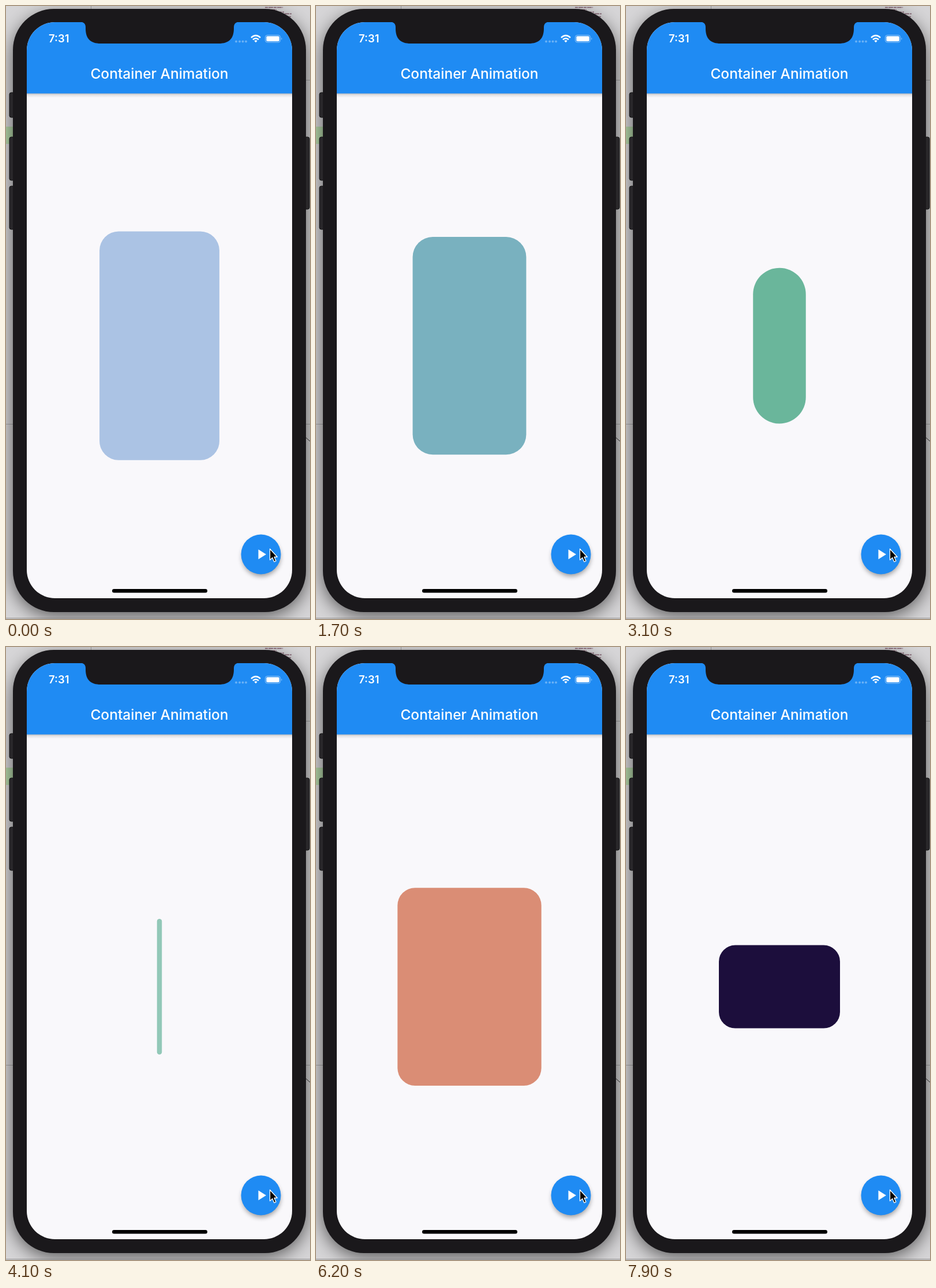
An HTML page that plays this animation: 527 px wide and 1062 px high, repeating every 8 s.

```html
<!DOCTYPE html>
<html lang="en">
<head>
<meta charset="utf-8">
<title>Container Animation</title>
<style>
  html, body { margin: 0; width: 100%; height: 100%; overflow: hidden; background: #cfcfcf; }
  svg { display: block; width: 100%; height: 100%; }
  text { font-family: Inter, Roboto, sans-serif; fill: #fff; }
</style>
</head>
<body>
<svg viewBox="0 0 527 1062" xmlns="http://www.w3.org/2000/svg">
  <defs>
    <filter id="blur" x="-20%" y="-20%" width="140%" height="140%"><feGaussianBlur stdDeviation="16"/></filter>
    <filter id="soft" x="-50%" y="-50%" width="200%" height="200%"><feGaussianBlur stdDeviation="4"/></filter>
    <linearGradient id="barShade" x2="0" y2="1">
      <stop offset="0" stop-color="#000" stop-opacity=".26"/>
      <stop offset=".4" stop-color="#000" stop-opacity=".09"/>
      <stop offset="1" stop-color="#000" stop-opacity="0"/>
    </linearGradient>
    <clipPath id="screen"><rect x="36" y="28" width="460" height="998" rx="49"/></clipPath>
  </defs>

  <!-- desktop behind the phone -->
  <rect width="527" height="1062" fill="#d6d5d7"/>
  <rect y="209" width="14" height="30" fill="#b5d6a9"/>
  <path d="M0 724.5H14M518 724.5H527M518 128.5H527M147.500 0V5" stroke="#a5a5a7" fill="none"/>
  <path d="M519 747L527 754" stroke="#333"/>
  <path d="M449 2.500h31M453 6.500h16M458 10.500h24M462 13.500h33M468 18.500h26" stroke="#6b3f52" stroke-width="1.500" stroke-dasharray="5 1 8 1" opacity=".8"/>
  <rect x="12" y="16" width="508" height="1040" rx="72" opacity=".62" filter="url(#blur)"/>
  <path d="M0 1060.500H527" stroke="#777" opacity=".7"/>

  <!-- phone -->
  <g fill="#29272a" stroke="#111">
    <rect x="6" y="150" width="14" height="43" rx="3"/>
    <rect x="6" y="227" width="14" height="75" rx="3"/>
    <rect x="6" y="312" width="14" height="75" rx="3"/>
    <rect x="512" y="227" width="14" height="125" rx="3"/>
  </g>
  <rect x="12" y="5" width="508" height="1045" rx="71" fill="#1a181b"/>

  <g clip-path="url(#screen)">
    <rect x="36" y="28" width="460" height="998" fill="#f9f8fb"/>
    <rect x="36" y="151" width="460" height="8" fill="url(#barShade)"/>
    <rect x="36" y="28" width="460" height="123.500" fill="#1f8bf3"/>
    <path d="M129 27.500Q138 28 138 37V39C138 57 147 65 164 65H369C386 65 395 57 395 39V37Q395 28 404 27.500Z" fill="#1a181b"/>
  </g>

  <!-- status bar and title -->
  <text x="74" y="63" font-size="18.500" font-weight="600">7:31</text>
  <text x="266" y="125.500" font-size="24.500" font-weight="500" text-anchor="middle">Container Animation</text>
  <g fill="#fff" opacity=".33">
    <circle cx="399" cy="61.500" r="1.900"/><circle cx="405" cy="61.500" r="1.900"/>
    <circle cx="410.500" cy="61.500" r="1.900"/><circle cx="416" cy="61.500" r="1.900"/>
  </g>
  <g fill="none" stroke="#fff" stroke-width="2.500">
    <path d="M425 54.800Q433 47.500 441 54.800"/>
    <path d="M428 58.200Q433 53.800 438 58.200"/>
  </g>
  <path d="M430.300 60.300Q433 58.200 435.700 60.300L433 63.200Z" fill="#fff"/>
  <rect x="449.500" y="50.500" width="26" height="12.500" rx="3.600" fill="none" stroke="#fff" stroke-opacity=".5"/>
  <rect x="451.300" y="52.300" width="22.500" height="9" rx="2" fill="#fff"/>
  <path d="M477.300 54.500Q479.500 56.700 477.300 59Z" fill="#fff" opacity=".5"/>

  <rect id="box"/>

  <!-- floating button -->
  <circle cx="442.500" cy="955" r="33" opacity=".38" filter="url(#soft)"/>
  <circle cx="442" cy="950" r="34.500" fill="#1f8bf3"/>
  <circle id="glow" cx="442" cy="950" r="34.500" fill="#bcbcbc"/>
  <path d="M437.500 941.500L451 950L437.500 958.500Z" fill="#fff"/>
  <path d="M457.500 940.500V959.700L461.800 955.700L464.900 962.800L468 961.400L465 954.500H470.300Z" fill="#000" stroke="#fff" stroke-width="1.300" stroke-linejoin="round"/>
  <rect x="184" y="1010" width="165" height="6.500" rx="3.250"/>
</svg>
<script>
const LOOP = 8000, STEP = 100, GROW = 1000, DELAY = 40;
const CX = 266, CY = 588.6;

// Each tap starts a move to the state beside it: width, height, radius, r, g, b.
const first = [329, 356, 104, 154, 198, 161];
const moves = [
  { tap: -537, to: [172, 408, 12, 176, 194, 248] },
  { tap: 1350, to: [235, 330, 70, 37, 151, 104] },
  { tap: 2650, to: [8.5, 235, 40, 146, 200, 184] },
  { tap: 4150, to: [199, 118, 11, 62, 126, 236] },
  { tap: 5350, to: [250.5, 348, 31, 222, 141, 114] },
  { tap: 7210, to: [206, 124, 28, 9, 2, 55] }
];
const box = document.getElementById("box");
const glow = document.getElementById("glow");
const clamp = v => Math.min(1, Math.max(0, v));

// cubic-bezier(.4, 0, .2, 1)
function ease(x) {
  let lo = 0, hi = 1;
  for (let i = 0; i < 24; i++) {
    const s = (lo + hi) / 2, q = 1 - s;
    if (1.2 * q * q * s + 0.6 * q * s * s + s * s * s < x) lo = s; else hi = s;
  }
  return lo * lo * (3 - 2 * lo);
}

// Brief highlight on the button after a tap
function flash(age) {
  if (age < 0 || age > 300) return 0;
  return age < 65 ? age * 0.0034 : 0.221 * (300 - age) / 235;
}

function setAttrs(el, attrs) {
  for (const k in attrs) el.setAttribute(k, attrs[k]);
}

function draw(t) {
  let state = first, light = 0;
  for (const { tap, to } of moves) {
    const p = ease(clamp((t - tap - DELAY) / GROW));
    state = state.map((v, i) => v + (to[i] - v) * p);
    light = Math.max(light, flash(t - tap));
  }
  const [w, h, r, ...rgb] = state;
  setAttrs(box, {
    x: CX - w / 2, y: CY - h / 2, width: w, height: h,
    rx: Math.min(r, w / 2, h / 2),
    fill: `rgb(${rgb.map(Math.round)})`
  });
  glow.setAttribute("opacity", light);
}

const start = performance.now();
function tick() {
  const t = (performance.now() - start) % LOOP;
  draw(Math.floor(t / STEP) * STEP);
  requestAnimationFrame(tick);
}
tick();
</script>
</body>
</html>
```
